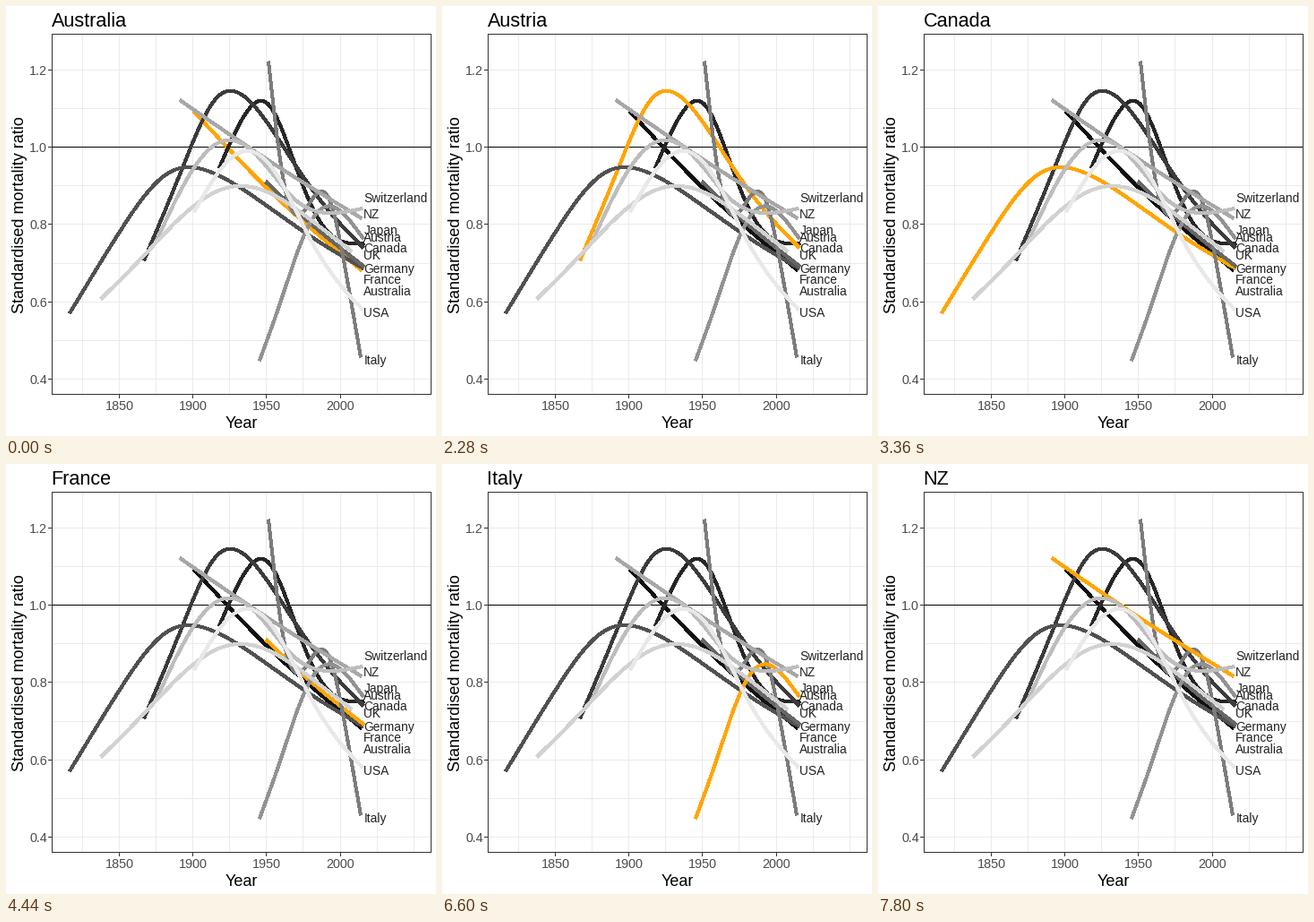
A matplotlib script for the animation above (8 s loop, 480x480 px).

```python
import math

import numpy as np
import matplotlib.pyplot as plt
from matplotlib.animation import FuncAnimation
from matplotlib.patches import Rectangle

SIZE, DPI = 480, 72
INTERVAL_MS, LOOP_MS = 40, 8000
STEP_MS = 120            # the picture can only change on these steps
STEPS_PER_CYCLE = 100    # steps to visit every country once
LEFT, RIGHT, TOP, BOTTOM = 51, 474, 31, 433
ORANGE, GRID, DARK = "#ffa500", "#ebebeb", "#333333"

plt.rcParams["font.family"] = "Liberation Sans"

# name: first x, last x, label y, heights at evenly spaced knots (pixels)
COUNTRIES = {
    "Australia": (210, 397, 318, [118, 215, 295]),
    "Austria": (238, 400, 258, [181, 124, 109, 167, 233, 262, 265]),
    "Canada": (154, 399, 270, [284, 186, 102, 111, 169, 226, 270]),
    "France": (71, 399, 305, [343, 254, 187, 188, 222, 260, 293]),
    "Germany": (290, 400, 293, [196, 247, 291]),
    "Italy": (293, 396, 395, [62, 197, 233, 212, 218, 294, 392]),
    "Japan": (283, 399, 250, [396, 331, 264, 226, 231, 260]),
    "NZ": (194, 397, 232, [105, 174, 237]),
    "Switzerland": (168, 398, 214, [262, 186, 150, 170, 215, 231, 226]),
    "UK": (106, 386, 278, [327, 280, 232, 203, 208, 238, 274]),
    "USA": (210, 398, 342, [230, 180, 162, 191, 252, 303, 339]),
}
NAMES = list(COUNTRIES)


def year_x(year):
    return math.floor(126.3 + (year - 1850) * 1.6455)


def ratio_y(ratio):
    return math.floor(157.6 + (1 - ratio) * 431.5)


def natural_spline(x0, x1, heights, count=160):
    """Natural cubic spline through evenly spaced knots."""
    y = np.array(heights, float)
    n = len(y)
    system = np.eye(n)
    rhs = np.zeros(n)
    for i in range(1, n - 1):
        system[i, i - 1:i + 2] = 1, 4, 1
        rhs[i] = 6 * (y[i - 1] - 2 * y[i] + y[i + 1])
    bend = np.linalg.solve(system, rhs)
    t = np.linspace(0, n - 1, count)
    k = np.minimum(t.astype(int), n - 2)
    b = t - k
    a = 1 - b
    curve = (a * y[k] + b * y[k + 1]
             + ((a**3 - a) * bend[k] + (b**3 - b) * bend[k + 1]) / 6)
    return np.linspace(x0, x1, count), curve


def grey(index):
    return f"#{round(16 + 21.6 * index):02x}"[:3] and (
        (16 + 21.6 * index) / 255,) * 3


fig = plt.figure(figsize=(SIZE / DPI, SIZE / DPI), dpi=DPI, facecolor="white")
ax = fig.add_axes([0, 0, 1, 1])
ax.set(xlim=(0, SIZE), ylim=(SIZE, 0))
ax.axis("off")


def rule(xs, ys, color, z):
    ax.plot(xs, ys, color=color, lw=1, antialiased=False, zorder=z,
            solid_capstyle="butt")


def write(x, y, text, size, color="black", ha="left", **kw):
    return ax.text(x, y, text, size=size, color=color, ha=ha, va="baseline",
                   zorder=6, **kw)


for year in range(1825, 2051, 25):
    rule([year_x(year)] * 2, [TOP, BOTTOM], GRID, 1)
for tenth in range(4, 13):
    rule([LEFT, RIGHT], [ratio_y(tenth / 10)] * 2, GRID, 1)
rule([LEFT, RIGHT], [ratio_y(1)] * 2, "black", 2)

for year in range(1850, 2001, 50):
    x = year_x(year)
    rule([x, x], [BOTTOM, BOTTOM + 4], DARK, 5)
    write(x + 0.5, 451, str(year), 14.4, "#4d4d4d", "center")
for tenth in range(4, 13, 2):
    y = ratio_y(tenth / 10)
    rule([LEFT - 4, LEFT], [y, y], DARK, 5)
    write(46, y + 6, f"{tenth / 10:.1f}", 14.4, "#4d4d4d", "right")

lines = []
for i, (name, (x0, x1, label_y, heights)) in enumerate(COUNTRIES.items()):
    lines += ax.plot(*natural_spline(x0, x1, heights), lw=3,
                     antialiased=False, solid_capstyle="butt",
                     zorder=3 + i / 100)
    write(399.3, label_y + 5, name, 13.7, "#222222")

ax.add_patch(Rectangle((LEFT, TOP), RIGHT - LEFT, BOTTOM - TOP, fill=False,
                       ec=DARK, lw=1, antialiased=False, zorder=5))
write(262.5, 471, "Year", 18, ha="center")
write(20.5, 233, "Standardised mortality ratio", 18, ha="center", rotation=90,
      rotation_mode="anchor")
title = write(50.5, 23, NAMES[0], 21.6)


def state_at(step):
    """Index of the country whose turn it is, shared evenly over the cycle."""
    return max(0, math.floor((step + 0.1) * len(NAMES) / STEPS_PER_CYCLE))


def update(frame):
    step = frame * INTERVAL_MS // STEP_MS
    active = state_at(step)
    for i, line in enumerate(lines):
        line.set_color(ORANGE if i == active else grey(i))
    title.set_text(NAMES[state_at(step - 1)])  # the title follows one step late
    return [*lines, title]


anim = FuncAnimation(fig, update, frames=LOOP_MS // INTERVAL_MS,
                     interval=INTERVAL_MS, repeat=True, repeat_delay=0)
plt.show()
```
